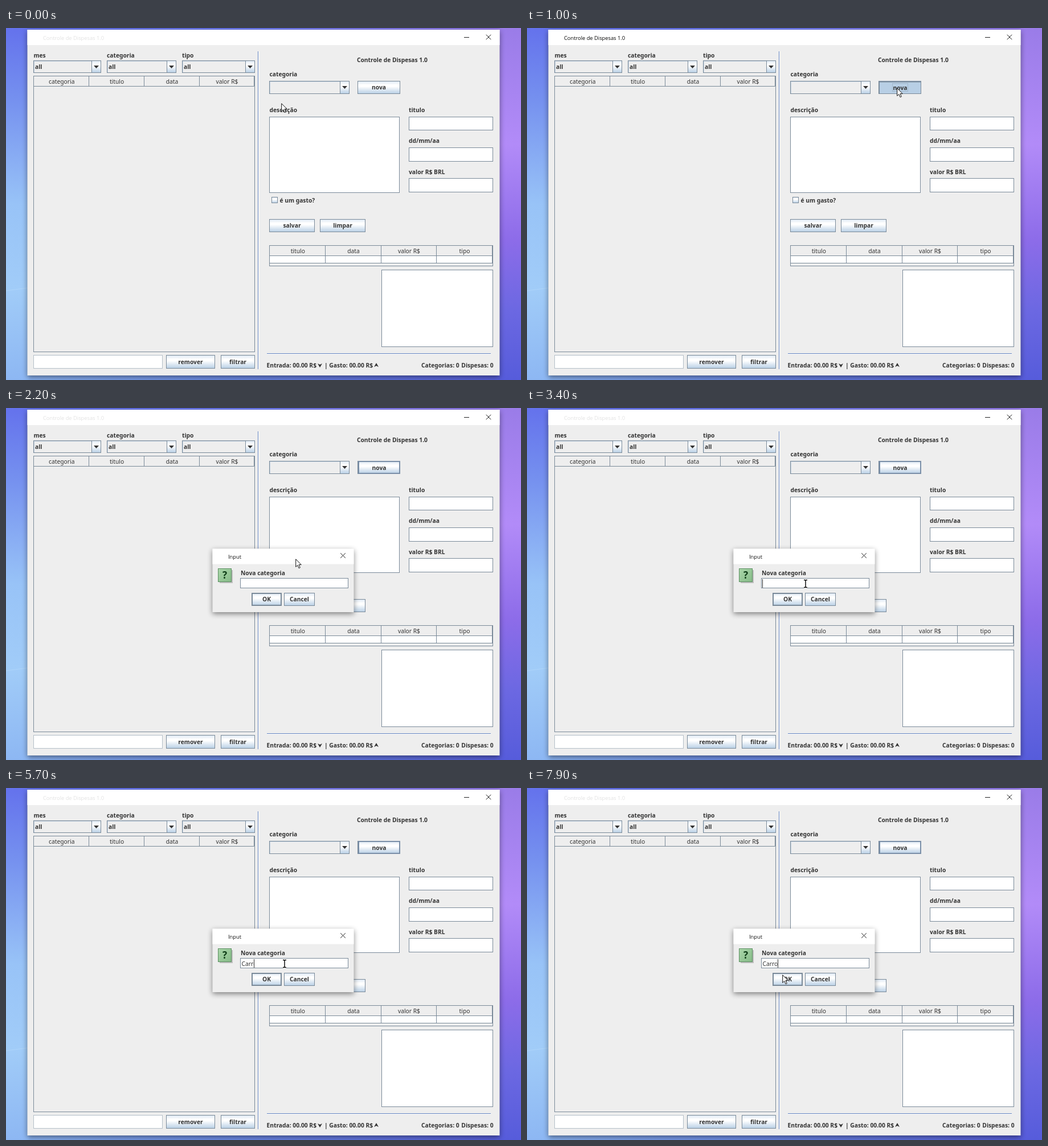
An HTML page that plays this animation: 904 by 619 pixels, repeating every 8 s.

```html
<!DOCTYPE html>
<html lang="pt">
<head>
<meta charset="utf-8">
<title>Controle de Dispesas 1.0</title>
<style>
  html, body { margin: 0; width: 100%; height: 100%; overflow: hidden; }
  svg { display: block; width: 904px; height: 619px; }
  text { font: 10.25px "Noto Sans", sans-serif; fill: #333; white-space: pre; }
  .bold { font-weight: 700; }
  .caption { font: 9.3px "Open Sans", sans-serif; fill: #111; }
  .inactive { fill: #e2e2e2; }
  .shadow { filter: drop-shadow(0 3px 5px #0007); }
  .line { stroke: #7a8a99; fill: none; }
  .sign { stroke: #222; fill: none; }

  .timed { animation: 8s step-end infinite; }
  #arrow { animation-name: arrow; }
  #ibeam { animation-name: ibeam; }
  #hover { animation-name: hover; }
  #pressed, #active { animation-name: press; }
  #dialog { animation-name: dialog; }
  #typing { animation-name: typing; }
  #caret { animation-name: blink; }

  @keyframes arrow {
    0%     { transform: translate(483px, 132px); }
    1.25%  { transform: translate(560px, 127px); }
    3.75%  { transform: translate(592px, 119px); }
    5%     { transform: translate(624px, 110px); }
    6.25%  { transform: translate(641px, 106px); }
    7.5%   { transform: translate(649px, 105px); }
    21.25% { transform: translate(645px, 116px); }
    22.5%  { transform: translate(628px, 142px); }
    23.75% { transform: translate(603px, 172px); }
    25%    { transform: translate(573px, 204px); }
    26.25% { transform: translate(538px, 238px); }
    27.5%  { transform: translate(508px, 265px); }
    28.75% { transform: translate(498px, 279px); }
    30%    { transform: translate(493px, 290px); opacity: 1; }
    31.25% { opacity: 0; }
    93.75% { transform: translate(478px, 330px); opacity: 1; }
    95%    { transform: translate(450px, 347px); }
    97.5%  { transform: translate(443px, 337px); }
    98.75%, 100% { transform: translate(448px, 328px); opacity: 1; }
  }
  @keyframes ibeam {
    0%     { transform: translate(490px, 304px); opacity: 0; }
    31.25% { transform: translate(490px, 304px); opacity: 1; }
    42.5%  { transform: translate(489px, 309px); opacity: 1; }
    93.75%, 100% { transform: translate(489px, 309px); opacity: 0; }
  }
  @keyframes hover { 0% { opacity: 0; } 5%, 100% { opacity: 1; } }
  @keyframes press { 0% { opacity: 0; } 12.5% { opacity: 1; } 16.25%, 100% { opacity: 0; } }
  @keyframes dialog { 0% { opacity: 0; } 16.25%, 100% { opacity: 1; } }
  @keyframes typing {
    0%     { transform: translateX(0); }
    58.75% { transform: translateX(7px); }
    63.75% { transform: translateX(13px); }
    68.75% { transform: translateX(17px); }
    71.25% { transform: translateX(22px); }
    82.5%, 100% { transform: translateX(27px); }
  }
  @keyframes blink {
    0%, 28.75%, 53.75%, 82.5%, 93.75%, 100% { opacity: 1; }
    22.5%, 47.5%, 77.5%, 88.75% { opacity: 0; }
  }
</style>
</head>
<body>
<svg viewBox="0 0 904 619">
  <defs>
    <linearGradient id="steel" x2="0" y2="1">
      <stop stop-color="#dde8f3"/><stop offset=".3" stop-color="#fff"/>
      <stop offset=".42" stop-color="#fff"/><stop offset="1" stop-color="#b8cfe5"/>
    </linearGradient>
    <linearGradient id="skyLeft" x2="0" y2="1">
      <stop stop-color="#6472ec"/><stop offset=".2" stop-color="#7590ef"/>
      <stop offset=".5" stop-color="#98c3f7"/><stop offset=".74" stop-color="#a1ccf8"/>
      <stop offset="1" stop-color="#8db7f3"/>
    </linearGradient>
    <linearGradient id="skyRight" x2="0" y2="1">
      <stop stop-color="#9a7ce8"/><stop offset=".33" stop-color="#b28bf8"/>
      <stop offset=".6" stop-color="#8d6ce9"/><stop offset=".8" stop-color="#6c68e2"/>
      <stop offset="1" stop-color="#565cdb"/>
    </linearGradient>
    <linearGradient id="skyTop">
      <stop stop-color="#6472ec"/><stop offset=".5" stop-color="#6f7cf0"/><stop offset="1" stop-color="#9a7ce8"/>
    </linearGradient>
    <linearGradient id="skyBottom">
      <stop stop-color="#8db7f3"/><stop offset=".4" stop-color="#6f8fe9"/><stop offset="1" stop-color="#565cdb"/>
    </linearGradient>
    <linearGradient id="green" x2="1" y2="1">
      <stop stop-color="#a9d6a9"/><stop offset="1" stop-color="#86bb88"/>
    </linearGradient>
  </defs>

  <rect width="904" height="30" fill="url(#skyTop)"/>
  <rect y="590" width="904" height="29" fill="url(#skyBottom)"/>
  <rect width="40" height="619" fill="url(#skyLeft)"/>
  <rect x="864" width="40" height="619" fill="url(#skyRight)"/>
  <path d="M0 462L38 457" stroke="#b9dafa" opacity=".6"/>

  <g id="form"></g>

  <g id="hover" class="timed">
    <rect x="619" y="94" width="72" height="21" stroke="#7a8fa8" stroke-width="2" fill="url(#steel)"/>
    <text class="bold" x="655" y="108.5" text-anchor="middle">nova</text>
  </g>
  <g id="pressed" class="timed">
    <rect x="618.5" y="94.5" width="73" height="21" class="line" style="fill:#b8cfe5"/>
    <path d="M619 95H691" stroke="#7a8a99"/>
    <rect x="641.5" y="97.5" width="27" height="14" fill="none" stroke="#a3b8cc"/>
    <text class="bold" x="655" y="108.5" text-anchor="middle">nova</text>
  </g>
  <text id="active" class="timed caption" x="65" y="21">Controle de Dispesas 1.0</text>

  <g id="dialog" class="timed">
    <g id="panel"></g>
    <text x="413.5" y="312.5">Carro</text>
    <g id="typing" class="timed">
      <rect x="412.6" y="301" width="32" height="15" fill="#fff"/>
      <path id="caret" class="timed" d="M413.5 301V316" stroke="#333"/>
    </g>
  </g>

  <g id="ibeam" class="timed" fill="none">
    <path d="M-3 -6.5H3M0 -6.5V6.5M-3 6.5H3" stroke="#fff" stroke-width="3"/>
    <path d="M-3 -6.5H-1L0 -5.5L1 -6.5H3M0 -6V6M-3 6.5H-1L0 5.5L1 6.5H3" stroke="#000" stroke-width="1.4"/>
  </g>
  <path id="arrow" class="timed" d="M.7 .8V14.4L3.8 11.5L6.1 16.7L8.3 15.7L6 10.6H10.2Z" fill="#fff" stroke="#111"/>
</svg>

<script>
  const rect = (x, y, w, h, fill, extra = 'class="line"') =>
    `<rect x="${x + .5}" y="${y + .5}" width="${w - 1}" height="${h - 1}" ${extra} style="fill:${fill}"/>`;
  const path = (d, cls = 'line', style = '') => `<path d="${d}" class="${cls}" style="${style}"/>`;
  const text = (s, x, y, cls = 'bold', anchor = 'start') =>
    `<text x="${x}" y="${y}" class="${cls}" text-anchor="${anchor}">${s}</text>`;

  const field = (x, y, w, h) => rect(x, y, w, h, '#fff');
  const button = (s, x, y, w, h) =>
    rect(x, y, w, h, 'url(#steel)') + text(s, x + w / 2, y + h / 2 + 3.7, 'bold', 'middle');
  const combo = (x, y, w, h, s) => {
    const b = x + w - 17, m = b + 8.5;
    return rect(x, y, w, h, '#eee') + rect(b, y, 17, h, 'url(#steel)') +
      path(`M${x + 1} ${y + 1.5}H${b}M${x + 1.5} ${y + 1}V${y + h - 1}`, '', 'stroke:#c5d3e1') +
      path(`M${m - 4.5} ${y + 9}H${m + 4.5}L${m} ${y + 14}Z`, '', 'fill:#333') +
      text(s, x + 3, y + 14.5);
  };
  // Column titles centred between consecutive edges.
  const header = (names, edges, top, bottom) =>
    path(`M${edges[0]} ${bottom}H${edges[4]}` + edges.slice(1).map(x => `M${x} ${top}V${bottom}`).join('')) +
    names.map((s, i) => text(s, (edges[i] + edges[i + 1]) / 2 + .5, bottom - 5, '', 'middle')).join('');
  const cross = (x, y, r) =>
    path(`M${x - r} ${y - r}L${x + r} ${y + r}M${x + r} ${y - r}L${x - r} ${y + r}`, 'sign');
  const chevron = (x, y, k) =>
    path(`M${x - 4} ${y - 3 * k}L${x} ${y - k}L${x + 4} ${y - 3 * k}L${x} ${y + 4 * k}Z`, '', 'fill:#333');
  const frame = (x, y, w, h, bar) =>
    `<rect x="${x}" y="${y}" width="${w}" height="${h}" fill="#eee" class="shadow"/>` +
    `<rect x="${x}" y="${y}" width="${w}" height="${bar}" fill="#fff"/>`;

  document.getElementById('form').innerHTML = [
    frame(37.5, 3, 829, 608, 27),
    text('Controle de Dispesas 1.0', 65, 21, 'caption inactive'),
    path('M804 16.5H813', 'sign'), cross(847, 16, 4.3),

    text('mes', 48.5, 51.5), text('categoria', 177, 51.5), text('tipo', 309, 51.5),
    combo(48, 57, 119, 22, 'all'), combo(177, 57, 122, 22, 'all'), combo(309, 57, 128, 22, 'all'),
    rect(48, 84, 389, 486, '#eee'),
    header(['categoria', 'titulo', 'data', 'valor R$'], [49, 145.5, 242.5, 339.5, 435.5], 85, 102.5),
    rect(48, 575, 227, 24, '#fff', 'stroke="#b5bfc9"'),
    button('remover', 281, 575, 86, 24), button('filtrar', 377, 575, 60, 24),
    path('M442.5 41V600M458 572.5H851', '', 'stroke:#6382bf'),
    path('M443.5 41V600M458 573.5H851', '', 'stroke:#fff'),

    text('Controle de Dispesas 1.0', 616, 60),
    text('categoria', 462.5, 85), combo(462, 93, 141, 23, ''), button('nova', 617, 93, 75, 23),
    text('descrição', 462.5, 147.5), field(462, 156, 229, 134),
    text('titulo', 707, 147.5), field(707, 156, 148, 24),
    text('dd/mm/aa', 707, 202), field(707, 210, 148, 25),
    text('valor R$ BRL', 707, 256.5), field(707, 264, 148, 25),
    rect(466, 297, 11, 11, 'url(#steel)'), text('é um gasto?', 480.5, 306.5),
    button('salvar', 462, 336, 80, 23), button('limpar', 551, 336, 80, 23),

    rect(462, 382, 393, 37, '#eee'),
    rect(462, 400, 392, 14, '#fff'),
    header(['titulo', 'data', 'valor R$', 'tipo'], [463, 560.5, 658.5, 755.5, 853.5], 383, 400.5),
    path('M560.5 401V414M658.5 401V414M755.5 401V414'),
    field(659, 425, 196, 136),

    text('Entrada: 00.00 R$', 457.5, 597), chevron(551, 593, 1),
    text('| Gasto: 00.00 R$', 559, 597), chevron(650, 593, -1),
    text('Categorias: 0', 729, 597), text('Dispesas: 0', 855.5, 597, 'bold', 'end')
  ].join('');

  document.getElementById('panel').innerHTML = [
    frame(362.5, 247.5, 248, 111.5, 27),
    text('Input', 390, 265, 'caption'), cross(591.5, 259.5, 4.3),
    '<rect x="375" y="285" width="23" height="23" fill="#0003"/>',
    rect(372, 282, 24, 24, 'url(#green)', 'stroke="#5c8f62"'),
    `<text x="384" y="300" text-anchor="middle" style="font-size:17px;font-weight:800;fill:#0b3a14">?</text>`,
    text('Nova categoria', 412, 293.5), field(411, 299, 190, 18),
    button('OK', 431, 325, 53, 23), rect(432, 326, 51, 21, 'none'),
    button('Cancel', 488, 325, 54, 23)
  ].join('');
</script>
</body>
</html>
```
